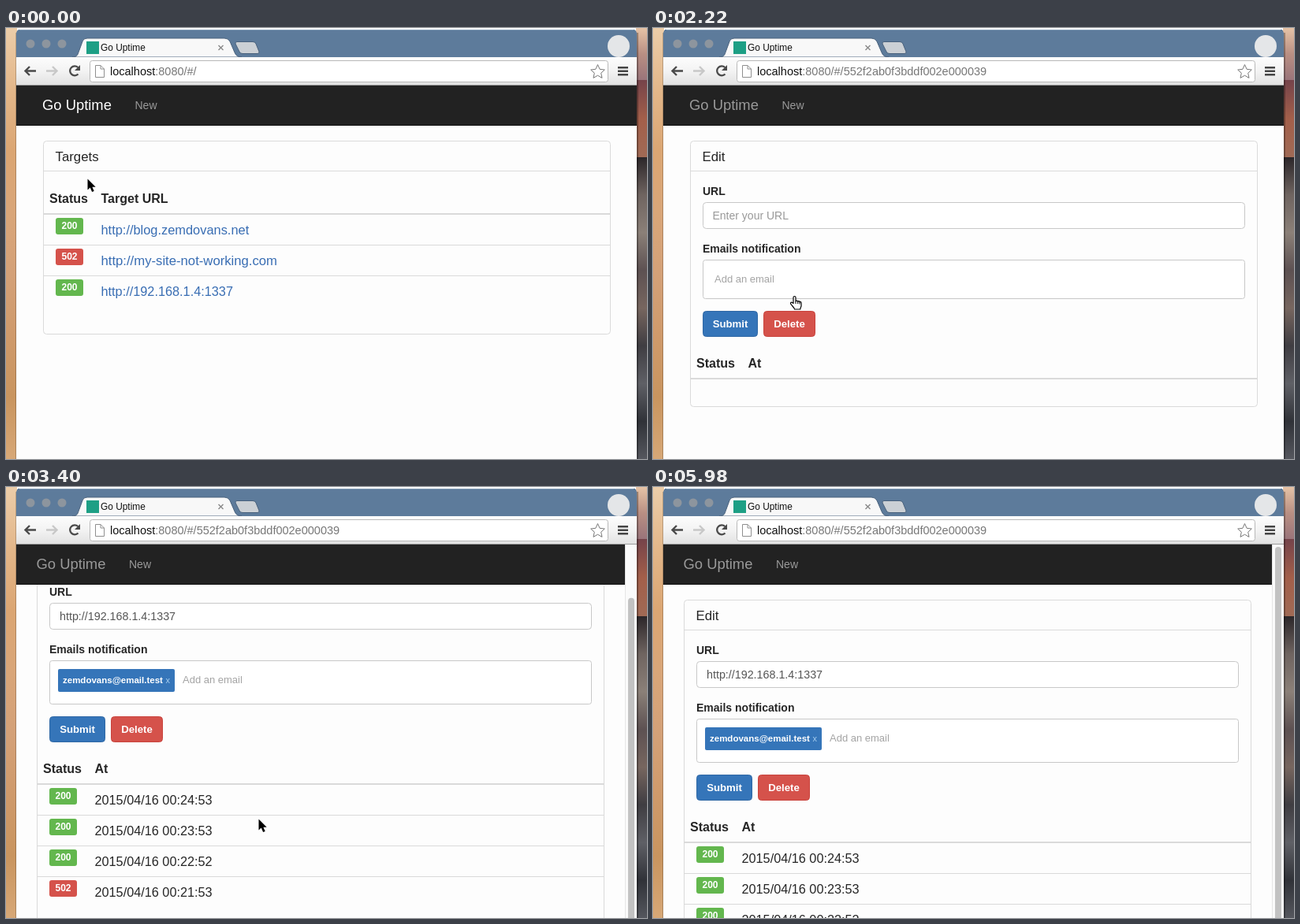
Animation, 813 px wide and 547 px high, one loop 6.08 s. Source, as an HTML page with a canvas:

```html
<!DOCTYPE html>
<html lang="en">
<head>
<meta charset="utf-8">
<title>Go Uptime</title>
<style>
  html, body { margin: 0; width: 100%; height: 100%; overflow: hidden; }
  canvas { display: block; }
</style>
</head>
<body>
<canvas id="stage" width="813" height="547"></canvas>
<script>
const ctx = document.getElementById('stage').getContext('2d');
const LOOP = 6080;
const OPEN_AT = 2220, LOADED_AT = 2370;
const INK = '#262626', LINE = '#dadada', PAGE = '#fdfdfd';
const GREEN = '#63b74e', RED = '#d5524b', BLUE = '#3575b9', LINK = '#386db3';

// [start, shape, x, y]
const cursorSteps = [
  [0, 'arrow', 103.5, 191], [150, 'arrow', 139.5, 123], [300, 'hand', 141, 111],
  [450, 'hand', 151, 106], [590, 'hand', 132, 106], [740, 'hand', 112, 114],
  [890, 'arrow', 105.5, 198], [1030, 'arrow', 152.5, 301], [1180, 'hand', 168, 333],
  [1330, 'hand', 170, 336], [1480, 'hand', 173, 340], [2660, 'arrow', 178.5, 341],
  [2810, 'arrow', 264.5, 396], [2960, 'arrow', 319.5, 422], [3110, 'arrow', 320.5, 421],
  [5190, 'arrow', 432.5, 480], [5340, 'none', 0, 0]
];
// [start, scroll offset]
const scrollSteps = [[0, 0], [3250, 27], [3400, 74], [4440, 69], [4590, 0]];
const stepAt = (steps, t) => steps.findLast(step => step[0] <= t);

const shapes = {
  arrow: new Path2D('M0 .5V14.5L3.2 11.6L5.6 17L8.2 15.9L5.9 10.7H10.2Z'),
  hand: new Path2D('M5 9.5V2a1.5 1.5 0 0 1 3 0V6.8c.5-1 2.4-.9 2.7.4c.6-.9 2.1-.6 2.3.5' +
    'c.8-.7 2-.2 2 1.2V12.5c0 1.6-1.2 2-1.2 4.5H6.5C6.5 15 3 12.5 1.6 10C.9 8.4 2.8 7.7 3.8 8.6Z'),
  knuckles: new Path2D('M8 10V6.8M10.7 10V7.2M13 10.5V7.7'),
  star: new Path2D('M750.5 46.5l2.6 5.8 6.2.7-4.6 4.2 1.3 6.2-5.5-3.2-5.5 3.2 1.3-6.2-4.6-4.2 6.2-.7Z')
};

function fill(x, y, w, h, color) {
  ctx.fillStyle = color;
  ctx.fillRect(x, y, w, h);
}

function round(x, y, w, h, r, color, border) {
  ctx.beginPath();
  ctx.roundRect(x, y, w, h, r);
  ctx.fillStyle = color;
  ctx.fill();
  if (border) stroke(border);
}

function stroke(color, width = 1, path) {
  ctx.strokeStyle = color;
  ctx.lineWidth = width;
  path ? ctx.stroke(path) : ctx.stroke();
}

function shape(d, color, border, width) {
  const path = new Path2D(d);
  if (color) { ctx.fillStyle = color; ctx.fill(path); }
  if (border) stroke(border, width, path);
}

function circle(x, y, r, color) {
  round(x - r, y - r, 2 * r, 2 * r, r, color);
}

// Returns the x position where the text ends.
function text(str, x, y, size, color = INK, weight = 'normal', align = 'left') {
  ctx.font = `${weight} ${size}px "Liberation Sans", Arial, sans-serif`;
  ctx.textAlign = align;
  ctx.fillStyle = color;
  ctx.fillText(str, x, y);
  return x + ctx.measureText(str).width;
}

function gradient(x, y, w, h, colors) {
  const g = ctx.createLinearGradient(0, y, 0, y + h);
  colors.forEach((color, i) => g.addColorStop(i / (colors.length - 1), color));
  fill(x, y, w, h, g);
}

function wallpaper() {
  gradient(0, 0, 14, 547, ['#eccda9', '#e3b78a', '#dba673', '#d9a679', '#d4a178',
    '#cf9a6b', '#c9955f', '#d7a877']);
  gradient(799, 0, 14, 66, ['#e6c3a6', '#b98f83', '#9a747a']);
  gradient(799, 66, 14, 98, ['#75434a', '#a35f4a', '#a06a55']);
  gradient(799, 164, 14, 383, ['#2b2629', '#6f6460', '#8b8078', '#5d5152', '#77665f',
    '#3f3d42', '#5f6066', '#303238', '#55575e']);
  fill(12, 6, 1, 541, 'rgba(0,0,0,.2)');
  fill(800, 6, 2, 541, 'rgba(0,0,0,.3)');
}

function browser(path) {
  round(13, 2, 787, 60, [5, 5, 0, 0], '#5d7b9b');
  fill(17, 2, 779, 1, '#86a0b8');
  for (const x of [31, 51, 71]) circle(x, 20, 5.5, '#8d959e');
  shape('M84 37C91 37 91 33 93 28L97 17Q98 13 103 13H277Q282 13 284 17L290 31Q292 37 299 37Z',
    '#f8f8f8', '#48617c');
  shape('M293 17.5H313Q316 17.5 317 20L321 30Q321.500 32.500 319 32.500H300Q297 32.500 296 30L291 20Q290.500 17.500 293 17.500Z',
    '#cbd0d5', '#48617c');
  fill(102, 17, 16, 16, '#1d9f85');
  text('Go Uptime', 120, 29, 11.9, '#111');
  shape('M269.500 22l6 6M275.500 22l-6 6', null, '#888', 1.4);
  circle(777, 23, 14, '#e4e6e8');

  gradient(13, 37, 787, 35, ['#fcfcfc', '#f3f3f3', '#e2e2e2']);
  fill(13, 72, 787, 1, '#9c9c9c');
  const arrowBack = 'M30 49L24.500 54.500L30 60M25 54.500H38';
  shape(arrowBack, null, '#4a4a4a', 2.4);
  shape('M59 49L64.500 54.500L59 60M64 54.500H51', null, '#c8c8c8', 2.4);
  shape('M91.500 58.500A6 6 0 1 1 91.300 50', null, '#4a4a4a', 2.3);
  shape('M94 47V54H87Z', '#4a4a4a');
  round(106.5, 41.5, 657, 27, 3, '#fff', '#b9b9b9');
  shape('M113.500 47.500H120L124.500 52V62.500H113.500ZM120 47.500V52H124.500', '#fff', '#8f8f8f');
  text(path, text('localhost', 132, 60, 14.5, '#111'), 60, 14.5, '#777');
  stroke('#777', 1, shapes.star);
  for (const y of [49, 53.5, 58]) fill(776, y, 13, 2.5, '#444');
}

function badge(code, x, y) {
  round(x, y, 35, 21, 3, code === 200 ? GREEN : RED);
  text(code, x + 17.5, y + 14, 12, '#fff', 'bold', 'center');
}

function panel(title, x, height) {
  round(x + .5, 143.5, 719, height, 4, PAGE, LINE);
  fill(x + 1, 181, 718, 1, LINE);
  text(title, x + 15.5, 169, 16.8);
}

function tableHead(x, y, label) {
  text('Status', x + 8, y, 16, INK, 'bold');
  text(label, x + 73.5, y, 16, INK, 'bold');
  fill(x + 1, y + 13, 718, 2, LINE);
}

function row(x, y, code, label, size, color) {
  badge(code, x + 16, y + 5);
  return text(label, x + 73.5, y + 26, size, color);
}

function listPage(t) {
  panel('Targets', 47, 245);
  if (t >= 150) {
    fill(101, 144, 50, 37, '#f4f4f4');
    text('Targets', 62.5, 169, 16.8);
  }
  tableHead(47, 222, 'Target URL');
  fill(48, 275, 718, 1, LINE);
  fill(48, 314, 718, 1, LINE);
  row(47, 236, 200, 'http://blog.zemdovans.net', 16.4, LINK);
  row(47, 275, 502, 'http://my-site-not-working.com', 16.7, LINK);
  const hover = t >= 1180, color = hover ? '#27466f' : LINK;
  const end = row(47, 314, 200, 'http://192.168.1.4:1337', 16.3, color);
  if (hover) fill(120.5, 341, end - 120.5, 1, color);
}

function button(label, x, y, w, color, border) {
  round(x + .5, y + .5, w - 1, 32, 4, color, border);
  text(label, x + w / 2, y + 21, 13.2, '#fff', 'bold', 'center');
}

function editPage(loaded) {
  const x = loaded ? 39 : 47, shift = loaded ? 6 : 0;
  panel('Edit', x, loaded ? 499 : 337);
  text('URL', x + 16, 212, 14, INK, 'bold');
  round(x + 16.5, 221.5, 687, 33, 4, '#fff', '#c8c8c8');
  if (loaded) text('http://192.168.1.4:1337', x + 29, 243, 14.3, '#555');
  else text('Enter your URL', x + 28.5, 243, 14, '#999');

  text('Emails notification', x + 16, 285, 14, INK, 'bold');
  round(x + 16.5, 294.5, 687, 49 + shift, 3, '#fff', '#c8c8c8');
  if (loaded) {
    round(x + 27, 305, 148, 29, 2, BLUE);
    text('zemdovans@email.test', x + 33, 323, 11.5, '#fff', 'bold');
    text('x', x + 163.5, 323, 11, '#a5cdee');
  }
  text('Add an email', x + (loaded ? 185 : 31), 323, 13, '#a4a4a4');

  button('Submit', x + 16, 359 + shift, loaded ? 71 : 70, BLUE, '#3068a5');
  button('Delete', x + (loaded ? 94 : 93), 359 + shift, 66, RED, '#c9433d');
  tableHead(x, 431 + shift, 'At');
  if (!loaded) return;
  ['24:53', '23:53', '22:52', '21:53'].forEach((time, i) => {
    const y = 451 + 39 * i;
    if (i) fill(x + 1, y, 718, 1, LINE);
    row(x, y, i < 3 ? 200 : 502, '2015/04/16 00:' + time, 16.25);
  });
}

function cursor(t) {
  const [, kind, x, y] = stepAt(cursorSteps, t);
  if (kind === 'none') return;
  const hand = kind === 'hand';
  ctx.save();
  ctx.translate(x, y);
  ctx.lineJoin = 'round';
  ctx.fillStyle = hand ? '#fff' : '#000';
  if (hand) {
    ctx.fill(shapes.hand);
    stroke('#000', 1.2, shapes.hand);
    stroke('#000', 1, shapes.knuckles);
  } else {
    stroke('#fff', 2, shapes.arrow);
    ctx.fill(shapes.arrow);
  }
  ctx.restore();
}

function draw(t) {
  const opened = t >= OPEN_AT, loaded = t >= LOADED_AT;
  const scroll = stepAt(scrollSteps, t)[1];
  wallpaper();
  fill(13, 73, 787, 474, PAGE);
  ctx.save();
  ctx.translate(0, -scroll);
  opened ? editPage(loaded) : listPage(t);
  ctx.restore();

  browser(opened ? ':8080/#/552f2ab0f3bddf002e000039' : ':8080/#/');
  fill(13, 73, loaded ? 772 : 787, 51, '#222');
  fill(13, 123, loaded ? 772 : 787, 1, '#0e0e0e');
  const left = loaded ? 38.5 : 46;
  text('Go Uptime', left, 104, 18.4, t < 2080 ? '#fff' : '#9a9a9a');
  text('New', left + 117.5, 103, 14, t >= 450 && t < 740 ? '#fff' : '#9a9a9a');
  if (loaded) {
    fill(785, 73, 15, 474, '#fafafa');
    fill(785, 73, 1, 474, '#e6e6e6');
    round(789, 76 + scroll * .875, 8, 540, 4, '#c2c2c2');
  }
  cursor(t);
}

function tick() {
  draw(performance.now() % LOOP);
  requestAnimationFrame(tick);
}
tick();
</script>
</body>
</html>
```
